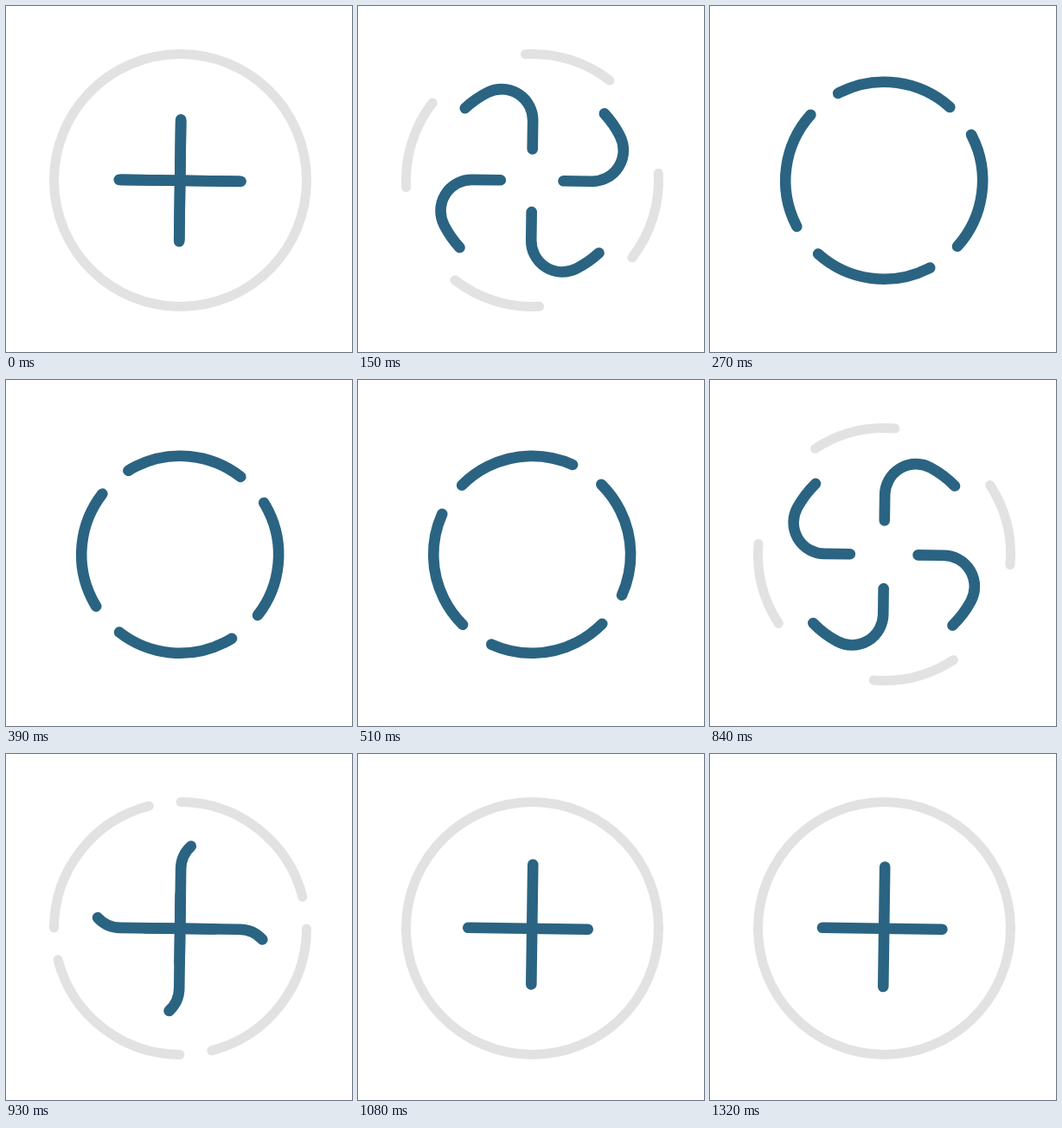
These frames come from a looping animation (400x400 px, 1.41 s). An HTML page without scripts:

```html
<!DOCTYPE html>
<html lang="en">
<head>
<meta charset="utf-8">
<title>Plus loader</title>
<style>
  @property --t { syntax: "<number>"; inherits: true; initial-value: 0; }

  html, body { margin: 0; height: 100%; overflow: hidden; background: #fff; }

  svg {
    display: block;
    width: 100vw;
    height: 100vh;
    fill: none;
    stroke-linecap: round;
    animation: tick 1410ms steps(47) infinite;

    /* --t counts 30 ms ticks; --f is the eased share of the journey */
    --p: clamp(0, var(--t) / 33.2, 1);
    --rise: pow(var(--p), 1.385);
    --fall: pow(1 - var(--p), 1.385);
    --f: calc(var(--rise) / (var(--rise) + var(--fall)));

    /* damped bounce after arrival */
    --after: clamp(0, var(--t) - 33.2, 10.8);
    --bounce: calc(3.2 * sin(var(--after) * 0.5818) * exp(var(--after) / -15));

    /* degrees turned since the start, or left until the end */
    --turn: calc(628 * min(var(--f), 1 - var(--f)));
    --span: calc(90 - 0.935 * var(--turn));
    --late: clamp(0, var(--t) - 16, 1);
    --from: calc((1 - var(--late)) * (22 - 0.48 * var(--turn))
               + var(--late) * (1.4175 * var(--turn) - 112));
  }
  @keyframes tick { to { --t: 47; } }

  .rim {
    stroke: #e2e2e2;
    stroke-width: 11px;
    stroke-dasharray: calc(1px * max(0, var(--span))) calc(1px * (90 - max(0, var(--span))));
    opacity: clamp(0, var(--span) * 100, 1);
    transform: rotate(calc(1deg * var(--from)));
  }
  .arms { stroke: #2a6482; stroke-width: 12.6px; }
  .arm {
    stroke-dasharray: 138.5px 3000px;
    stroke-dashoffset: calc(-1px * (1 + 1250 * var(--f) + var(--bounce)));
  }
  /* only one stroke per line stays for the bounce */
  .spare { opacity: clamp(0, 34 - var(--t), 1); }
</style>
</head>
<body>
<svg viewBox="0 0 400 400">
  <defs>
    <!-- up the line, curl onto the ring, one lap and a bit, curl back up the line;
         the half turns use a short radius, which grows to fit their chord exactly -->
    <path id="arm" class="arm" d="M0 69 V-69.2
      A36 36 0 0 0 -52.6 -101.1
      A113 113 0 0 0 52.6 101.1
      A113 113 0 0 0 -52.6 -101.1
      A114 114 0 0 0 -52.6 101.1
      A36 36 0 0 0 0 69.2 V-80"/>
  </defs>
  <circle class="rim" r="146" pathLength="360" style="translate: 201.5px 201.5px"/>
  <g class="arms" transform="translate(201.2 201.8) rotate(.8)">
    <use href="#arm"/>
    <use href="#arm" transform="rotate(-90)"/>
    <g class="spare">
      <use href="#arm" transform="rotate(90)"/>
      <use href="#arm" transform="rotate(180)"/>
    </g>
  </g>
</svg>
</body>
</html>
```
